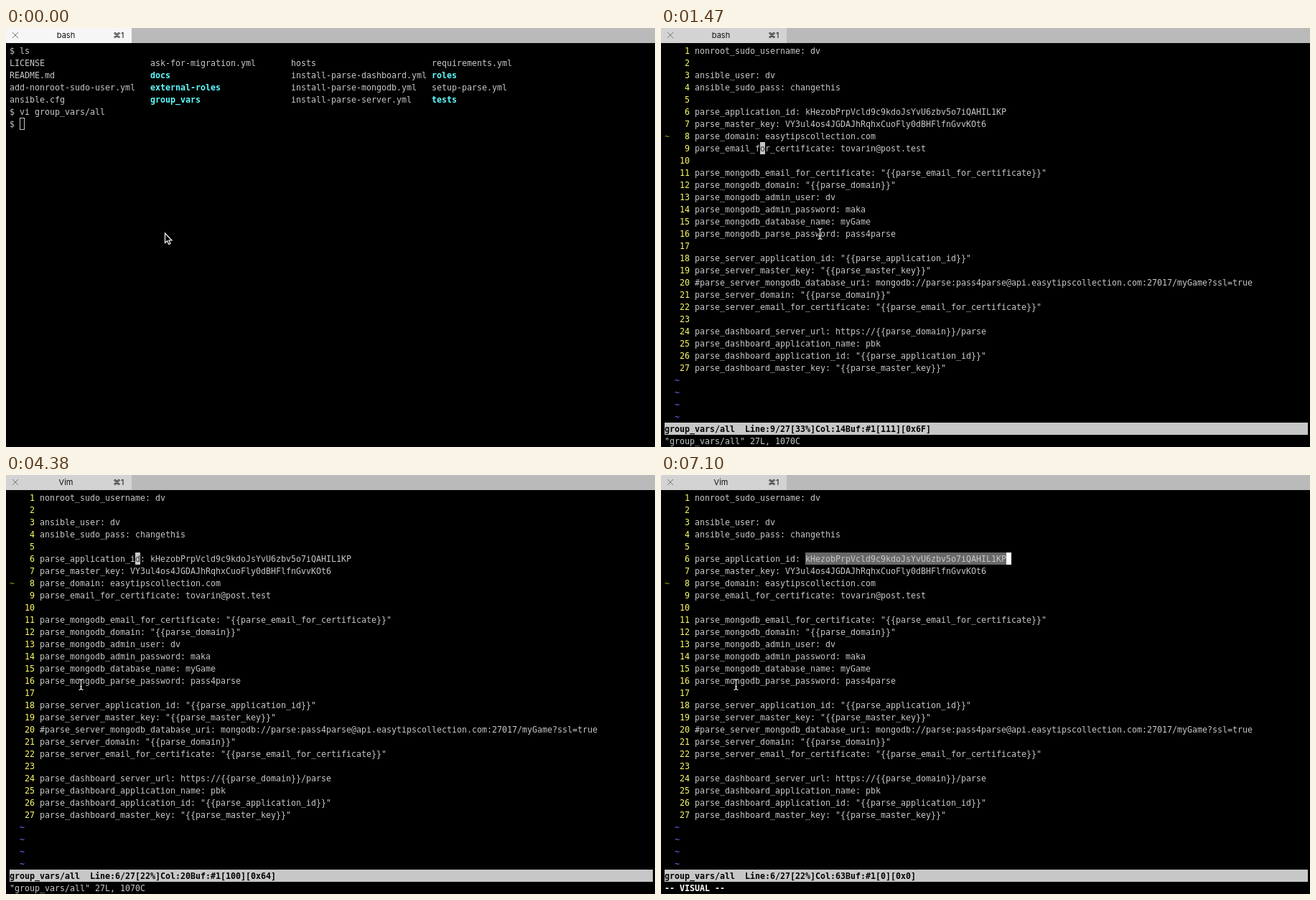
These frames come from a looping animation (904x584 px, 8 s). An HTML page with a canvas:

```html
<!DOCTYPE html>
<html lang="en">
<head>
<meta charset="utf-8">
<title>Terminal session</title>
<style>
html, body { margin: 0; width: 100%; height: 100%; overflow: hidden; background: #000; }
canvas { display: block; }
</style>
</head>
<body>
<canvas id="stage" width="904" height="584"></canvas>
<script>
const ctx = document.getElementById('stage').getContext('2d');
const LOOP = 8000;
const CELL_W = 7, CELL_H = 17, LEFT = 5, TOP = 23;
const MONO = '11.63px "DejaVu Sans Mono", monospace';
const FG = '#c7c7c7', YELLOW = '#fffc67', CYAN = '#60fdff', BLUE = '#6871ff', OLIVE = '#a5a300';

const listing = [
  ['LICENSE', 'ask-for-migration.yml', 'hosts', 'requirements.yml'],
  ['README.md', 'docs/', 'install-parse-dashboard.yml', 'roles/'],
  ['add-nonroot-sudo-user.yml', 'external-roles/', 'install-parse-mongodb.yml', 'setup-parse.yml'],
  ['ansible.cfg', 'group_vars/', 'install-parse-server.yml', 'tests/']
];

const file = `nonroot_sudo_username: dv

ansible_user: dv
ansible_sudo_pass: changethis

parse_application_id: kHezobPrpVcld9c9kdoJsYvU6zbv5o7iQAHIL1KP
parse_master_key: VY3ul4os4JGDAJhRqhxCuoFly0dBHFlfnGvvKOt6
parse_domain: easytipscollection.com
parse_email_for_certificate: tovarin@post.test

parse_mongodb_email_for_certificate: "{{parse_email_for_certificate}}"
parse_mongodb_domain: "{{parse_domain}}"
parse_mongodb_admin_user: dv
parse_mongodb_admin_password: maka
parse_mongodb_database_name: myGame
parse_mongodb_parse_password: pass4parse

parse_server_application_id: "{{parse_application_id}}"
parse_server_master_key: "{{parse_master_key}}"
#parse_server_mongodb_database_uri: mongodb://parse:pass4parse@api.easytipscollection.com:27017/myGame?ssl=true
parse_server_domain: "{{parse_domain}}"
parse_server_email_for_certificate: "{{parse_email_for_certificate}}"

parse_dashboard_server_url: https://{{parse_domain}}/parse
parse_dashboard_application_name: pbk
parse_dashboard_application_id: "{{parse_application_id}}"
parse_dashboard_master_key: "{{parse_master_key}}"`.split('\n');

// Each entry starts with its time in ms.
const caretSteps = [   // line, column
  [1470, 9, 14], [2920, 7, 14], [3130, 6, 14], [3340, 6, 15], [3550, 6, 16], [3750, 6, 17],
  [3960, 6, 18], [4380, 6, 20], [4590, 6, 22], [4790, 6, 23], [7100, 6, 63]
];
const mouseSteps = [[0, 221.5, 287], [2510, 132, 281], [2710, 104.5, 292]];

const current = (steps, t) => steps.filter(step => step[0] <= t).pop();
const cellX = col => LEFT + col * CELL_W;
const cellY = row => TOP + row * CELL_H;

function fill(x, y, w, h, color) {
  ctx.fillStyle = color;
  ctx.fillRect(x, y, w, h);
}

function fillCells(row, col, count, color) {
  fill(cellX(col), cellY(row), count * CELL_W, CELL_H, color);
}

function print(row, col, text, color = FG, bold = false) {
  ctx.font = (bold ? 'bold ' : '') + MONO;
  ctx.fillStyle = color;
  [...text].forEach((ch, i) => ctx.fillText(ch, cellX(col + i), cellY(row) + 13));
}

function tracePath(points, close) {
  ctx.beginPath();
  points.forEach(([x, y]) => ctx.lineTo(x, y));
  if (close) ctx.closePath();
}

function drawTabs(t) {
  fill(0, 0, 904, 21, '#bababa');
  fill(0, 0, 175, 21, t < 210 ? '#f6f6f6' : '#d3d3d3');
  ctx.strokeStyle = '#777';
  ctx.lineWidth = 1;
  for (const side of [-4, 4]) {
    tracePath([[13 - side, 6], [13 + side, 14]]);
    ctx.stroke();
  }
  ctx.font = '11px Inter, "DejaVu Sans", sans-serif';
  ctx.fillStyle = '#111';
  ctx.textAlign = 'center';
  ctx.fillText(t < 2300 ? 'bash' : 'Vim', 83.5, 14);
  ctx.textAlign = 'left';
  ctx.fillText('⌘1', 149, 14);
}

function drawShell(t) {
  const command = '$ vi group_vars/all';
  print(0, 0, '$ ls');
  listing.forEach((names, r) => names.forEach((name, c) => {
    const isDir = name.endsWith('/');
    print(r + 1, c * 28, name.replace('/', ''), isDir ? CYAN : FG, isDir);
  }));
  print(5, 0, command);
  print(6, 0, t < 840 ? '$' : command);
  if (t < 210) {
    ctx.strokeStyle = FG;
    ctx.lineWidth = 1;
    ctx.strokeRect(cellX(2) + .5, cellY(6) + .5, CELL_W - 1, CELL_H - 1);
  } else if (t < 1050) {
    fillCells(6, t < 840 ? 2 : 20, 1, FG);
  } else {
    fillCells(7, 0, 1, FG);
  }
}

function drawEditor(t) {
  const [, line, col] = current(caretSteps, t);
  const selecting = t >= 7100;
  const row = line - 1;
  if (selecting) fillCells(row, 28, 40, '#686868');
  file.forEach((text, i) => {
    print(i, 3, String(i + 1).padStart(2), YELLOW);
    print(i, 6, text);
  });
  print(7, 0, '~', OLIVE);
  for (let r = file.length; r < 31; r++) print(r, 2, '~', BLUE);

  const under = file[row][col - 1] || '';
  fillCells(row, col + 5, 1, selecting ? '#fff' : FG);
  print(row, col + 5, under, '#333');

  const code = under ? under.charCodeAt(0) : 0;
  const percent = Math.floor(line * 100 / file.length);
  const status = `group_vars/all  Line:${line}/${file.length}[${percent}%]Col:${col}Buf:#1` +
    `[${code}][0x${code.toString(16).toUpperCase()}]`;
  fillCells(31, 0, 128, FG);
  print(31, 0, status, '#000', true);
  if (t < 6050) print(32, 0, '"group_vars/all" 27L, 1070C');
  else print(32, 0, '-- VISUAL --', '#fff', true);
}

function drawArrow() {
  tracePath([[221.5, 286], [221.5, 299.5], [224.5, 296.8], [226.8, 301.5],
    [229, 300.5], [226.9, 296], [231, 296]], true);
  ctx.fillStyle = '#000';
  ctx.fill();
  ctx.strokeStyle = '#fff';
  ctx.lineWidth = 1.2;
  ctx.stroke();
}

function drawIBeam(x, y) {
  ctx.beginPath();
  for (const dir of [-1, 1]) {
    for (const side of [-3, 3]) {
      ctx.moveTo(x + side, y + dir * 7.5);
      ctx.quadraticCurveTo(x, y + dir * 7.5, x, y + dir * 5);
    }
  }
  ctx.moveTo(x, y - 5);
  ctx.lineTo(x, y + 5);
  ctx.moveTo(x - 1.5, y + 3);
  ctx.lineTo(x + 1.5, y + 3);
  for (const [width, color] of [[2.4, '#000'], [1.1, '#fff']]) {
    ctx.lineWidth = width;
    ctx.strokeStyle = color;
    ctx.stroke();
  }
}

function draw() {
  const t = performance.now() % LOOP;
  fill(0, 0, 904, 584, '#000');
  drawTabs(t);
  if (t < 1470) drawShell(t);
  else drawEditor(t);
  if (t < 210) drawArrow();
  else drawIBeam(...current(mouseSteps, t).slice(1));
  requestAnimationFrame(draw);
}
draw();
</script>
</body>
</html>
```
